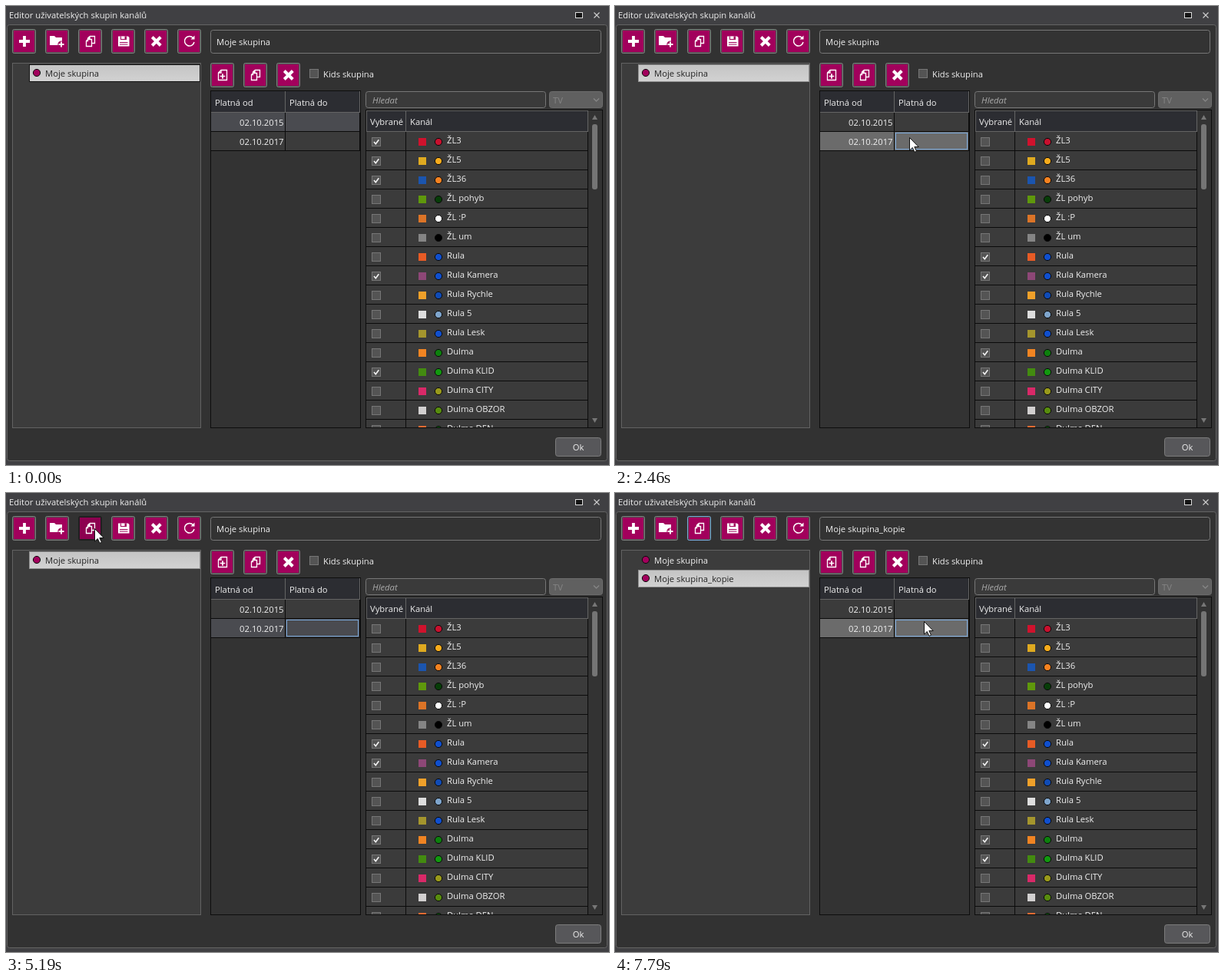
Recreate the animation shown at these times as an HTML page. Size 785 by 598 pixels, loop 8000 ms.

```html
<!DOCTYPE html>
<html lang="cs">
<head>
<meta charset="utf-8">
<title>Editor skupin</title>
<style>
  html, body { margin: 0; width: 100%; height: 100%; overflow: hidden; background: #404043; }
  svg { display: block; width: 785px; height: 598px; }
  text { font: 11.25px "Open Sans", "Noto Sans", sans-serif; fill: #f0f0f0; white-space: pre; }
</style>
</head>
<body>
<svg id="stage" viewBox="0 0 785 598"></svg>
<script>
const LOOP = 8000;
const PINK = '#a2005c';
const BLUE = '#79a7d9';

// name, logo colour, dot colour
const channels = [
  ['ŽL3', '#d0122d', '#c8102e'],
  ['ŽL5', '#dfaa20', '#f7ac1c'],
  ['ŽL36', '#1b55ae', '#f58220'],
  ['ŽL pohyb', '#5f980c', '#073d08'],
  ['ŽL :P', '#dc7427', '#ffffff'],
  ['ŽL um', '#858585', '#000000'],
  ['Rula', '#e75b25', '#104fce'],
  ['Rula Kamera', '#8d4777', '#104fce'],
  ['Rula Rychle', '#efa02a', '#104bb5'],
  ['Rula 5', '#dedede', '#7fa5cc'],
  ['Rula Lesk', '#a4952d', '#104fce'],
  ['Dulma', '#f18422', '#0d800d'],
  ['Dulma KLID', '#438b10', '#12980f'],
  ['Dulma CITY', '#d92968', '#999a1b'],
  ['Dulma OBZOR', '#d2d0d0', '#588c0e'],
  ['Dulma DEN', '#e26b32', '#0b600d']
];
const checkedSets = [[0, 1, 2, 7, 12], [6, 7, 11, 12]];

// pointer stops: time, x, y
const stops = [
  [1260, 745, 469], [1370, 640, 380], [1480, 500, 270], [1590, 411, 203],
  [1690, 398, 192], [1800, 390, 186], [1900, 388, 183], [2010, 386, 182],
  [2460, 384, 172], [2580, 381, 161],
  [3220, 380, 166], [3320, 380, 172], [3430, 380, 178],
  [4330, 341, 160], [4440, 280, 130], [4550, 215, 98], [4650, 165, 72],
  [4760, 135, 56], [4860, 120, 49], [4970, 116, 47], [5960, 115, 47],
  [6290, 118, 56], [6390, 129, 76], [6500, 190, 105], [6610, 280, 138],
  [6720, 350, 157], [6830, 390, 166], [6950, 403, 168]
];
// selected date row: time, row, has focus
const picks = [[0, 0, 0], [2010, 1, 1], [2920, 0, 1], [3430, 1, 1], [5620, 0, 0], [7790, 1, 1]];

const rect = (x, y, w, h, fill, more = '') =>
  `<rect x="${x}" y="${y}" width="${w}" height="${h}" fill="${fill}" ${more}/>`;
const box = (x, y, w, h, fill, stroke, r = 0, more = '') =>
  rect(x + .5, y + .5, w - 1, h - 1, fill, `stroke="${stroke}" rx="${r}" ${more}`);
const text = (x, y, s, more = '') => `<text x="${x}" y="${y}" ${more}>${s}</text>`;
const path = (d, stroke, w = 1, fill = 'none', more = '') =>
  `<path d="${d}" stroke="${stroke}" stroke-width="${w}" fill="${fill}" ${more}/>`;
const dot = (x, y, fill) => `<circle cx="${x}" cy="${y}" r="4.6" fill="${fill}" stroke="#080808"/>`;
const checkbox = (x, y) => box(x, y, 12, 12, '#545454', '#767676');

const icons = {
  add: path('M9 16H23M16 9V23', '#fff', 3.8),
  folder: path('M6 9h6l2 2h8v10H6Z', 'none', 0, '#fff') +
    `<circle cx="21" cy="20" r="4.6" fill="${PINK}"/>` + path('M17.5 20h7M21 16.5v7', '#fff', 2),
  copy: path('M15 9.5H21.5V18.5H17.5M15 9.5L12.5 12V14M15 9.5V12H12.5M12.5 13.5H17.5V22.5H10.5V15.5ZM12.5 13.5V15.5H10.5', '#fff', 1.3),
  save: path('M9 9.5H22L23.5 11V22.5H9Z', 'none', 0, '#fff') +
    rect(12, 9.5, 8, 4.5, PINK) + rect(13, 9.5, 4.5, 3.5, '#fff') + rect(11, 17, 10.5, 1, PINK) + rect(11, 19.5, 10.5, 1, PINK),
  remove: path('M10.3 10.5L21.3 21.5M21.3 10.5L10.3 21.5', '#fff', 4),
  reload: path('M20.5 11.5A6.3 6.3 0 1 0 22 17', '#fff', 1.5) + path('M22.5 8.5V13.5H17.5Z', 'none', 0, '#fff'),
  newPage: path('M14 9.5H21.5V22.5H10.5V13ZM14 9.5V13H10.5', '#fff', 1.3) + path('M12.7 17.5H19.3M16 14.2V20.8', '#fff', 1.7)
};
const button = (x, y, icon, id = '') =>
  `<g transform="translate(${x} ${y})">` +
  box(0, 0, 31, 32, '#505050', '#7c7c7c', 2, id && `id="${id}"`) +
  rect(2, 2, 27, 28, PINK, id && `id="${id}Face"`) + icons[icon] + '</g>';

const treeItem = (i, y) =>
  `<g id="item${i}">` + rect(30.5, y + .5, 222, 22, 'none', `id="itemBg${i}"`) + dot(40, y + 11, PINK) +
  text(51, y + 16, i ? 'Moje skupina_kopie' : 'Moje skupina', `id="itemText${i}"`) + '</g>';

const dateRow = (i, date) => {
  const y = 139 + 25 * i;
  return rect(267, y, 193, 24, '#3b3b3b', `id="row${i}"`) +
    path(`M267 ${y + 24.5}H461M363.5 ${y}V${y + 25}M460.5 ${y}V${y + 25}`, '#0b0b0b') +
    box(365, y + 1, 94, 22, 'none', BLUE, 0, `id="cell${i}"`) +
    text(361.5, y + 17, date, 'text-anchor="end"');
};

const channelRow = ([name, logo, colour], i) => {
  const y = 164 + 25 * i;
  return rect(469, y, 288, 24, '#3b3b3b') + path(`M469 ${y + 24.5}H757`, '#0b0b0b') +
    checkbox(476, y + 7) + path(`M479 ${y + 13}l2.3 2.8 4-5.6`, '#f4f4f4', 1.6, 'none', `id="tick${i}"`) +
    rect(537, y + 8, 10, 10, logo) + dot(563, y + 13, colour) + text(574, y + 15, name);
};

const stage = document.getElementById('stage');
stage.innerHTML =
  `<defs><clipPath id="list"><rect x="469" y="136" width="289" height="413"/></clipPath>
  <linearGradient id="picked" x2="0" y2="1"><stop stop-color="#c4c4c4"/><stop offset="1" stop-color="#d2d2d2"/></linearGradient></defs>` +
  rect(0, 0, 785, 598, '#404043') +
  box(1, 24, 782, 569, '#323232', '#646464', 3) +
  text(4, 16, 'Editor uživatelských skupin kanálů') +
  box(741, 8, 10, 8, '#141414', '#dcdcdc') +
  path('M765.5 8.5l7 7M772.5 8.5l-7 7', '#d0d0d0', 1.1) +
  ['add', 'folder', 'copy', 'save', 'remove', 'reload']
    .map((n, i) => button(8 + 43 * i, 30, n, n === 'copy' ? 'copyBtn' : '')).join('') +
  box(266, 31, 509, 31, '#333', '#777', 3) + text(274, 51, '', 'id="title"') +
  box(8, 74, 246, 476, '#3c3c3c', '#626262') +
  treeItem(0, 76) + treeItem(1, 100) +
  ['newPage', 'copy', 'remove'].map((n, i) => button(266 + 43 * i, 74, n)).join('') +
  checkbox(395, 82) + text(413, 93, 'Kids skupina') +
  box(266, 110, 196, 440, '#333', '#0d0d0d') +
  rect(267, 111, 194, 27, '#2c2d32') + path('M267 138.5H461M363.5 111V138M460.5 111V138', '#646464') +
  text(272, 130, 'Platná od') + text(369, 130, 'Platná do') +
  dateRow(0, '02.10.2015') + dateRow(1, '02.10.2017') +
  box(468, 111, 235, 22, '#3a3a3a', '#777', 3) +
  text(477, 127, 'Hledat', 'style="font-style:italic;fill:#aaa"') +
  box(707, 111, 70, 22, '#606060', '#6c6c6c', 3) + text(712, 127, 'TV', 'style="fill:#858585"') +
  path('M765 120.5l3.5 3.5 3.5-3.5', '#858585', 1.4) +
  box(468, 135, 309, 415, '#333', '#0d0d0d') +
  '<g clip-path="url(#list)">' +
  channels.map(channelRow).join('') +
  path('M520.5 164V549M757.5 164V549', '#0b0b0b') +
  box(469, 136, 289, 28, '#2c2d32', '#646464') + path('M520.5 136V164', '#646464') +
  text(474, 155, 'Vybrané') + text(526, 155, 'Kanál') + '</g>' +
  path('M763 148h7l-3.5-6z', 'none', 0, '#777') + path('M763 537h7l-3.5 6z', 'none', 0, '#777') +
  rect(763, 154, 7, 85, '#757575', 'rx="3"') +
  box(715, 562, 60, 25, '#57575a', '#7c7c7c', 3) + text(745, 579, 'Ok', 'text-anchor="middle"') +
  path('M0 0V16.5L3.8 13L6.5 18.8L9 17.7L6.3 12H11.7Z', '#111', 1, '#fff', 'id="pointer"');

const el = id => document.getElementById(id);
const set = (id, attrs) => { for (const k in attrs) el(id).setAttribute(k, attrs[k]); };
const show = (id, on) => set(id, { visibility: on ? 'visible' : 'hidden' });
const latest = (list, t) => list.reduce((found, e) => e[0] <= t ? e : found, null);

function over(x, y, w, h, t) {
  const p = latest(stops, t);
  return !!p && p[1] >= x && p[1] < x + w && p[2] >= y && p[2] < y + h;
}

// hover glow lags the pointer by a step
function glow(row, t) {
  const at = d => over(267, 139 + 25 * row, 194, 25, t - d);
  if (at(0)) return at(105) ? 1 : .5;
  return at(105) ? 1 : at(215) ? .5 : 0;
}

function mix(a, b, k) {
  return 'rgb(' + a.map((v, i) => Math.round(v + (b[i] - v) * k)) + ')';
}

function draw(t) {
  const copied = t >= 5620;
  const [, sel, focus] = latest(picks, t);

  el('title').textContent = copied ? 'Moje skupina_kopie' : 'Moje skupina';
  show('item1', copied);
  const hover = over(30, 76, 223, 24, t);
  set('itemBg0', {
    fill: !copied ? 'url(#picked)' : hover ? '#808080' : 'none',
    stroke: t < 2010 ? '#151515' : !copied ? '#8e8e8e' : hover ? '#6e6e6e' : 'none'
  });
  set('itemBg1', { fill: 'url(#picked)', stroke: '#8e8e8e' });
  el('itemText0').style.fill = !copied ? '#242424' : hover ? '#303030' : '#f0f0f0';
  el('itemText1').style.fill = '#242424';

  const pressed = t >= 5190 && !copied;
  set('copyBtn', {
    stroke: pressed ? '#202020' : copied ? BLUE : '#7c7c7c',
    fill: pressed ? '#202020' : '#505050'
  });
  set('copyBtnFace', { fill: pressed ? '#8d0050' : PINK });

  for (const i of [0, 1]) {
    const base = i === sel ? [74, 75, 80] : [59, 59, 59];
    set('row' + i, { fill: mix(base, [107, 107, 107], glow(i, t)) });
    show('cell' + i, focus && i === sel);
  }
  channels.forEach((_, i) => show('tick' + i, checkedSets[sel].includes(i)));

  const p = latest(stops, t);
  show('pointer', p);
  if (p) set('pointer', { transform: `translate(${p[1] - .5} ${p[2] - .5})` });
}

function tick(now) {
  draw(now % LOOP);
  requestAnimationFrame(tick);
}
draw(0);
requestAnimationFrame(tick);
</script>
</body>
</html>
```
